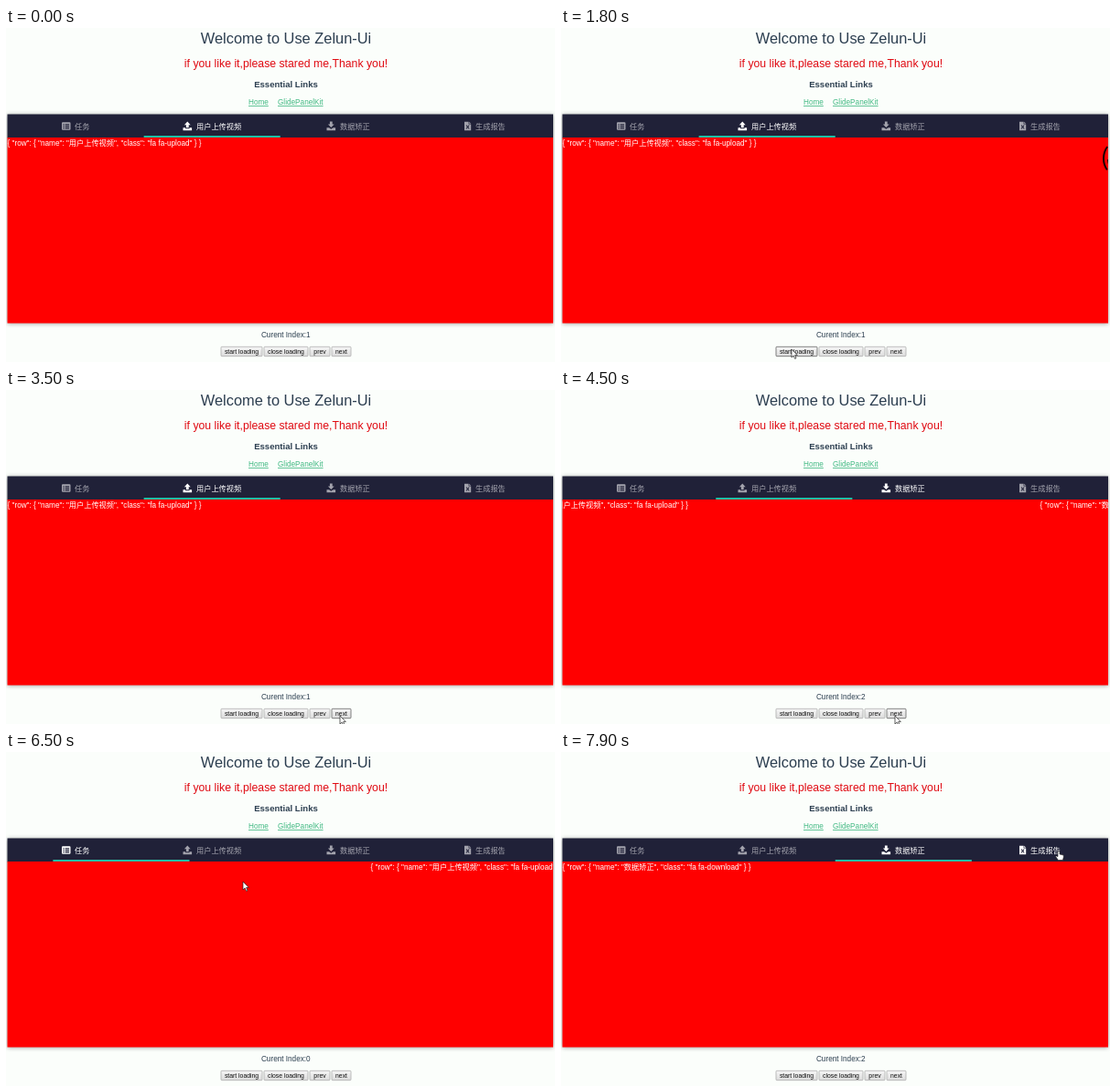
Animation, 600 px wide and 366 px high, one loop 8 s. Source, as an HTML page:

```html
<!DOCTYPE html>
<html lang="en">
<head>
<meta charset="utf-8">
<title>Tab panel demo</title>
<style>
  html, body { margin: 0; width: 100%; height: 100%; overflow: hidden; background: #fbfefb; }
  svg { display: block; width: 100vw; height: 100vh; }
  text { font-family: "Liberation Sans", Arial, "Noto Sans CJK SC", "Noto Sans CJK", sans-serif; font-size: 8.2px; fill: #2c3e50; white-space: pre; }
  .mid { text-anchor: middle; }
  .link { fill: #42b983; text-decoration: underline; }
  .row { fill: #fff; }
  .tab, .tab text { fill: #a3a3ad; }
  .tab { stroke: none; }
  .tab.on, .tab.on text { fill: #fff; }
  .button rect { fill: url(#face); stroke: #a5a5a5; stroke-width: .7; }
  .button.on rect { stroke: #505050; }
  .button text { font-size: 6.83px; fill: #111; text-anchor: middle; }
  .arc { fill: none; stroke: #180000; }
</style>
</head>
<body>
<svg viewBox="0 0 600 366" preserveAspectRatio="none">
  <defs>
    <linearGradient id="face" x2="0" y2="1">
      <stop offset="0" stop-color="#f6f6f6"/><stop offset="1" stop-color="#dcdcdc"/>
    </linearGradient>
    <filter id="soft" x="-5%" y="-5%" width="110%" height="110%"><feGaussianBlur stdDeviation="2.4"/></filter>
    <clipPath id="view"><rect x="1.5" y="120" width="596.5" height="203.5"/></clipPath>
  </defs>
  <rect width="600" height="366" fill="#fbfefb"/>
  <text class="mid" x="306" y="17" style="font-size:16.4px">Welcome to Use Zelun-Ui</text>
  <text class="mid" x="306" y="43" style="font-size:12.27px;fill:#e00a12">if you like it,please stared me,Thank you!</text>
  <text class="mid" x="306" y="64.6" style="font-size:9.58px;font-weight:bold">Essential Links</text>
  <text class="link" x="265" y="84">Home</text>
  <text class="link" x="297" y="84">GlidePanelKit</text>

  <rect x="1.5" y="95" width="596.5" height="229" fill="#000" opacity=".36" filter="url(#soft)"/>
  <rect x="1.5" y="94.5" width="596.5" height="26" fill="#202138"/>
  <rect x="1.5" y="120" width="596.5" height="203.5" fill="#f00"/>
  <g id="tabs"></g>
  <rect id="marker" y="118" width="149.1" height="2" fill="#20bfa5"/>
  <g clip-path="url(#view)">
    <g id="rows"></g>
    <g id="spinner">
      <g class="arc" id="rings"></g>
      <text class="mid" y="1.3" style="font-size:4.6px;fill:#850000">loading</text>
    </g>
  </g>
  <text id="index" class="mid" x="305.8" y="339"></text>
  <g id="buttons"></g>
  <g id="cursor">
    <circle id="press" cx="0.5" cy="1.5" r="10.3" fill="none" stroke="#e0161c" stroke-width="1.7"/>
    <path id="arrow" d="M0 0V9L2.1 7.1L3.6 10.4L5 9.8L3.6 6.6H6.3Z" fill="#fff" stroke="#222" stroke-width=".7"/>
    <path id="hand" d="M-1 1Q0 -.6 1 1V4L5 5Q5.6 5.4 5.2 7.5L4.4 10.5H-.6L-3.4 6.6Q-3 5.4 -1 6.6Z" fill="#fff" stroke="#222" stroke-width=".6"/>
  </g>
</svg>
<script>
const LOOP = 8000, PANEL_X = 1.5, PANEL_W = 596.5, TAB_W = PANEL_W / 4, SLIDE = 600;

const tabs = [
  { name: "任务", icon: "fa fa-list-alt", x: 61, textX: 75,
    path: "M1 0H8.5Q9.5 0 9.5 1V7.6Q9.5 8.6 8.5 8.6H1Q0 8.6 0 7.6V1Q0 0 1 0ZM1.4 2V3.2H2.6V2ZM3.6 2V3.2H8.1V2ZM1.4 4V5.2H2.6V4ZM3.6 4V5.2H8.1V4ZM1.4 6V7.2H2.6V6ZM3.6 6V7.2H8.1V6Z" },
  { name: "用户上传视频", icon: "fa fa-upload", x: 193.5, textX: 208,
    path: "M4.8 -.6L8.2 3H6.2V6H3.4V3H1.4ZM0 6H2.6V7H7V6H9.6V9H0Z" },
  { name: "数据矫正", icon: "fa fa-download", x: 350.5, textX: 365,
    path: "M3.4 -.6H6.2V2.2H8.2L4.8 5.8L1.4 2.2H3.4ZM0 6H2.6L4.8 7.6L7 6H9.6V9H0Z" },
  { name: "生成报告", icon: "fa fa-file-excel-o", x: 501, textX: 513,
    path: "M0 -.4H4.6V2.2H7.2V9H0ZM5.2 -.4L7.2 1.6H5.2ZM1.6 3.4L2.9 5.3L1.5 7.4H2.6L3.6 6L4.6 7.4H5.7L4.3 5.3L5.6 3.4H4.5L3.6 4.6L2.7 3.4Z" },
];
const buttons = [["start loading", 235, 45], ["close loading", 282, 48], ["prev", 332, 22], ["next", 356, 21]];

// Index changes: time and step
const steps = [[4430, 1], [5175, -1], [6268, -1], [6690, 1], [7270, 1]];
const OPEN = 1735, CLOSE = 2790;
const presses = [OPEN, CLOSE, ...steps.map(s => s[0])];

// Cursor stops: time, x, y
const path = [
  [0, 238, 390], [1050, 240, 374], [1400, 252, 352], [2050, 252, 352], [2480, 297, 354],
  [2950, 297, 354], [3500, 365, 357], [4650, 365, 357], [5000, 342, 359], [6290, 342, 359],
  [6500, 259, 142], [6620, 228, 110], [6850, 228, 110], [7150, 375, 110], [7450, 375, 110],
  [7800, 544, 108], [8000, 544, 108],
];

const $ = id => document.getElementById(id);
const clamp = v => Math.min(1, Math.max(0, v));
const bezier = (a, b, u) => 3 * a * u * (1 - u) ** 2 + 3 * b * u * u * (1 - u) + u ** 3;

// CSS "ease" timing curve
function ease(p) {
  if (p <= 0 || p >= 1) return clamp(p);
  let lo = 0, hi = 1;
  for (let i = 0; i < 20; i++) {
    const u = (lo + hi) / 2;
    if (bezier(.25, .25, u) < p) lo = u; else hi = u;
  }
  return bezier(.1, 1, lo);
}

function cursorAt(t) {
  const i = path.findIndex(k => k[0] > t);
  const [t0, x0, y0] = path[i - 1], [t1, x1, y1] = path[i];
  const p = (t - t0) / (t1 - t0), s = p * p * (3 - 2 * p);
  return [x0 + (x1 - x0) * s, y0 + (y1 - y0) * s];
}

$("tabs").innerHTML = tabs.map(t =>
  `<g class="tab"><path transform="translate(${t.x} 103.2)" fill-rule="evenodd" d="${t.path}"/>
   <text x="${t.textX}" y="111">${t.name}</text></g>`).join("");
$("rows").innerHTML = tabs.map((t, i) =>
  `<text class="row" x="${PANEL_X + i * PANEL_W}" y="128.8">{ "row": { "name": "${t.name}", "class": "${t.icon}" } }</text>`).join("");
$("buttons").innerHTML = buttons.map(([label, x, w]) =>
  `<g class="button"><rect x="${x}" y="349.3" width="${w}" height="10.4" rx=".8"/>
   <text x="${x + w / 2}" y="356.8">${label}</text></g>`).join("");

// Rings: radius, line width, arc count, filled share, turns per second
const rings = [[22, 2, 4, .78, .5], [17, 2.1, 3, .7, -.6], [11.6, 2.6, 9, .84, .4]];
$("rings").innerHTML = rings.map(([r, w, n, share]) => {
  const part = 2 * Math.PI * r / n;
  return `<circle r="${r}" stroke-width="${w}" stroke-dasharray="${part * share} ${part * (1 - share)}"/>`;
}).join("");

const move = (el, x, y) => el.setAttribute("transform", `translate(${x} ${y})`);
const show = (el, on) => el.setAttribute("visibility", on ? "visible" : "hidden");

function draw(t) {
  let index = 1, position = 1;
  for (const [at, step] of steps) {
    if (t >= at) index += step;
    position += step * ease((t - at) / SLIDE);
  }
  move($("rows"), -position * PANEL_W, 0);
  $("marker").setAttribute("x", PANEL_X + position * TAB_W);
  $("index").textContent = "Curent Index:" + index;

  const [x, y] = cursorAt(t);
  const onTabs = y > 95 && y < 120;
  const hoverTab = onTabs ? Math.floor((x - PANEL_X) / TAB_W) : -1;
  [...$("tabs").children].forEach((el, i) => el.classList.toggle("on", i === index || i === hoverTab));
  [...$("buttons").children].forEach((el, i) => {
    const [, left, width] = buttons[i];
    el.classList.toggle("on", y > 349 && y < 360 && x > left && x < left + width);
  });
  move($("cursor"), x, y);
  show($("arrow"), !onTabs);
  show($("hand"), onTabs);
  show($("press"), presses.some(p => t >= p - 130 && t < p));

  const away = 1 - ease((t - OPEN) / 500) + ease((t - CLOSE) / 500);
  show($("spinner"), away < 1);
  move($("spinner"), 575 + 47 * away, 143);
  [...$("rings").children].forEach((el, i) =>
    el.setAttribute("transform", `rotate(${rings[i][4] * 360 * t / 1000})`));
}

function frame() {
  draw(performance.now() % LOOP);
  requestAnimationFrame(frame);
}
frame();
</script>
</body>
</html>
```
